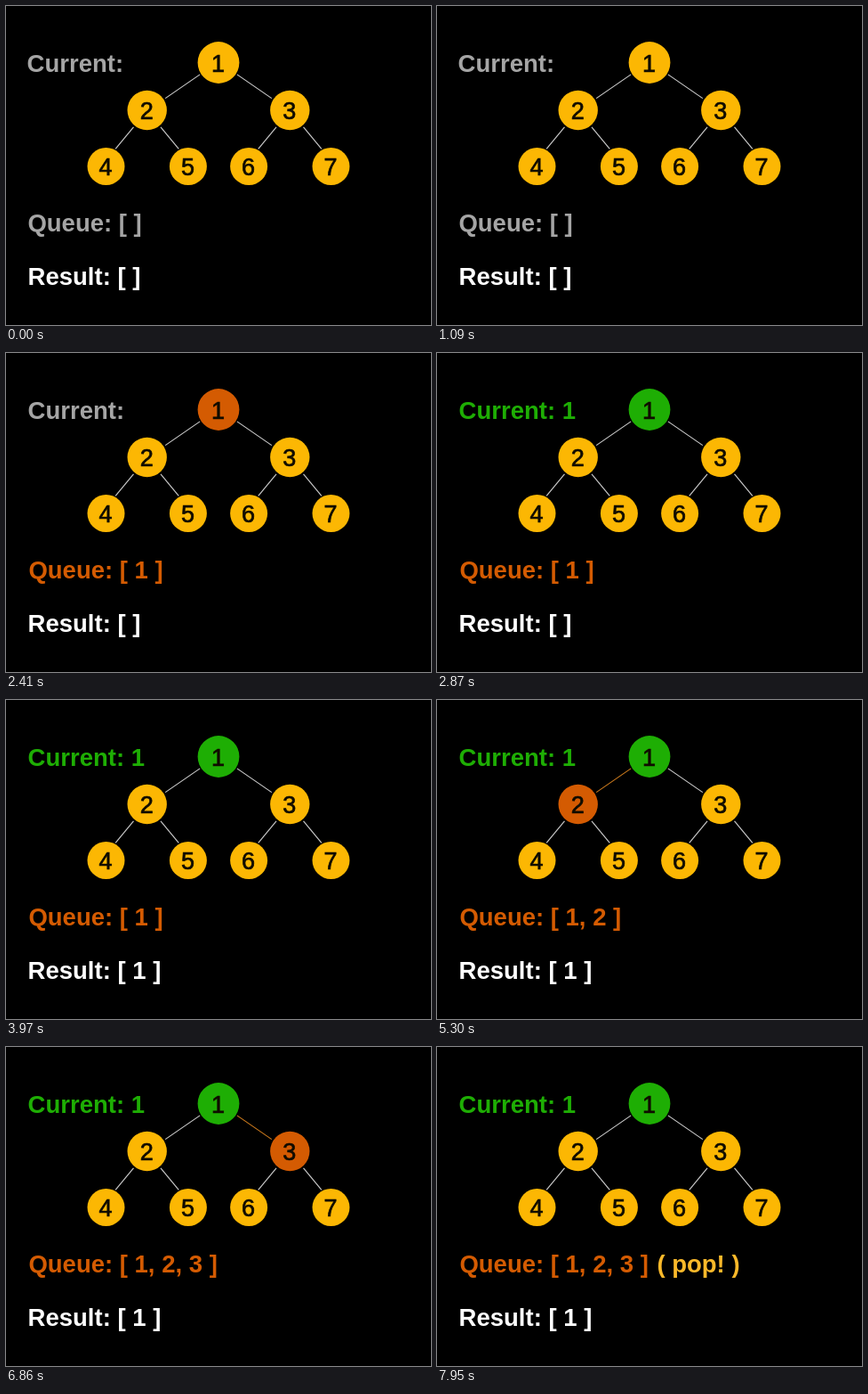
An HTML page with a canvas for the animation above (8 s loop, 478 by 358 pixels).

```html
<!DOCTYPE html>
<html lang="en">
<head>
<meta charset="utf-8">
<title>Breadth-first traversal</title>
<style>
  html, body { margin: 0; width: 100%; height: 100%; overflow: hidden; background: #000; }
  canvas { display: block; filter: blur(0.4px); }
</style>
</head>
<body>
<canvas id="stage" width="478" height="358"></canvas>
<script>
const ctx = document.getElementById('stage').getContext('2d');
const LOOP = 8000;
const YELLOW = '#fcb703', ORANGE = '#d45b02', GREEN = '#1eae04', GREY = '#a5a5a5', WHITE = '#fff';
const FONT = 'px "Liberation Sans", Arial, sans-serif';

// Offsets from parent to child, and the visible part of the edge between them
const levels = [
  null,
  { dx: 80.3, dy: 53.5, from: { x: 0.26, y: 0.25 }, to: { x: 0.745, y: 0.75 } },
  { dx: 46.2, dy: 63, from: { x: 0.33, y: 0.3 }, to: { x: 0.77, y: 0.69 } }
];

// Complete binary tree: the parent of node n is n >> 1, odd children go right
const nodes = [null, { x: 239, y: 63.5, r: 23.4 }];
for (let n = 2; n <= 7; n++) {
  const parent = nodes[n >> 1];
  const level = levels[Math.floor(Math.log2(n))];
  const dx = n % 2 ? level.dx : -level.dx;
  const along = part => ({ x: parent.x + dx * part.x, y: parent.y + level.dy * part.y });
  nodes[n] = {
    ...along({ x: 1, y: 1 }),
    r: parent.r - 1.2,
    from: along(level.from),
    to: along(level.to)
  };
}

// Each step overrides parts of the state from its start time on
const steps = [
  { at: 0, root: YELLOW, idle: GREY, shift: -1, visiting: 0, current: '', queue: '[ ]', result: '[ ]', pop: '' },
  { at: 1320, root: ORANGE, idle: ORANGE, shift: 0, queue: '[ 1 ]' },
  { at: 2640, root: GREEN, current: ' 1' },
  { at: 3970, result: '[ 1 ]' },
  { at: 5300, visiting: 2, queue: '[ 1, 2 ]' },
  { at: 6630, visiting: 3, queue: '[ 1, 2, 3 ]' },
  { at: 7950, visiting: 0, pop: '( pop! )' }
];

function label(text, x, y, color) {
  ctx.font = 'bold 27.5' + FONT;
  ctx.textAlign = 'left';
  ctx.fillStyle = color;
  ctx.fillText(text, x, y);
}

function drawEdge({ from, to }, color) {
  ctx.strokeStyle = color;
  ctx.lineWidth = 1.2;
  ctx.beginPath();
  ctx.moveTo(from.x, from.y);
  ctx.lineTo(to.x, to.y);
  ctx.stroke();
}

function drawNode({ x, y, r }, number, color) {
  ctx.fillStyle = color;
  ctx.beginPath();
  ctx.arc(x, y, r, 0, 2 * Math.PI);
  ctx.fill();
  ctx.font = '27' + FONT;
  ctx.textAlign = 'center';
  ctx.fillStyle = ctx.strokeStyle = '#100c00';
  ctx.lineWidth = 0.7;
  ctx.fillText(number, x - 0.5, y + 10);
  ctx.strokeText(number, x - 0.5, y + 10);
}

function draw(time) {
  const state = Object.assign({}, ...steps.filter(step => step.at <= time));
  ctx.fillStyle = '#000';
  ctx.fillRect(0, 0, 478, 358);

  for (let n = 1; n <= 7; n++) {
    const visited = n === state.visiting;
    if (n > 1) drawEdge(nodes[n], visited ? '#c8781c' : '#c8c8c8');
    drawNode(nodes[n], n, n === 1 ? state.root : visited ? ORANGE : YELLOW);
  }

  label('Current:' + state.current, 24.6 + state.shift, 74, state.current ? GREEN : GREY);
  label('Queue: ' + state.queue, 25.4 + state.shift, 253, state.idle);
  label('Result: ' + state.result, 24.6, 312.5, WHITE);
  label(state.pop, 247.4, 253, '#fbb92a');
}

function tick() {
  draw(performance.now() % LOOP);
  requestAnimationFrame(tick);
}
tick();
</script>
</body>
</html>
```
